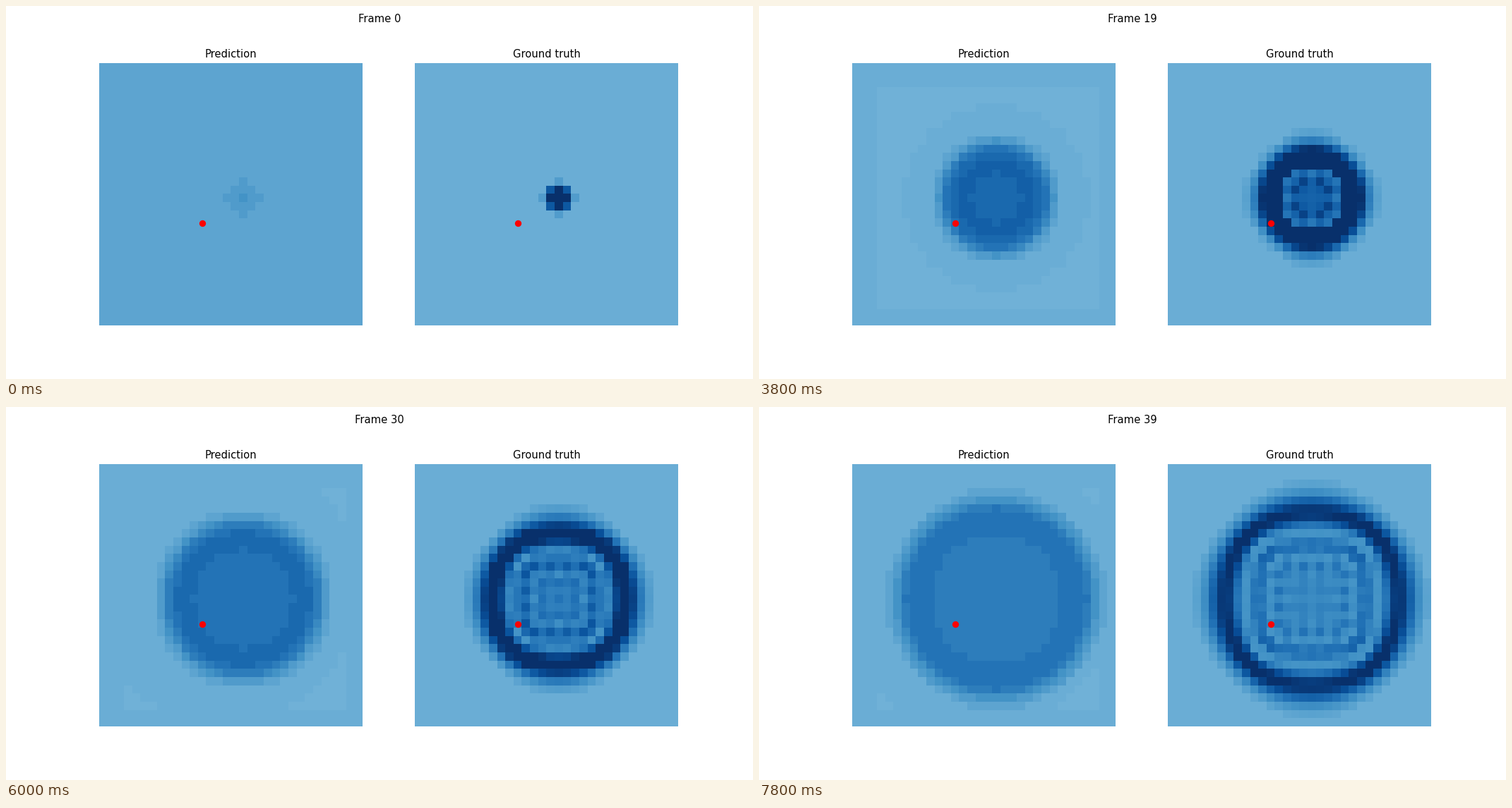
A matplotlib script for the animation above (8 s loop, 1058 px wide and 529 px high).

```python
import numpy as np
import matplotlib.pyplot as plt
from matplotlib.animation import FuncAnimation

SIZE = 32
FRAMES = 40
CX, CY = 17, 16          # wave centre, in cells
COURANT2 = 0.09          # (c * dt / dx) ** 2
AMPLITUDE = 2.4
TONE = 0.08              # spacing of the prediction's visible tones
FAINT = 0.062            # weaker waves blend into the background
FONT = 10.58

rows, cols = np.mgrid[:SIZE, :SIZE]
dx, dy = cols - CX, rows - CY
radius = np.hypot(dx, dy)


def laplacian(u):
    p = np.pad(u, 1)
    return p[2:, 1:-1] + p[:-2, 1:-1] + p[1:-1, 2:] + p[1:-1, :-2] - 4 * u


def solve_wave():
    """Leapfrog solution of an expanding wave, one field per frame."""
    prev, cur = np.zeros((SIZE, SIZE)), AMPLITUDE * np.exp(-radius**2)
    fields = []
    for _ in range(FRAMES):
        prev, cur = cur, 2 * cur - prev + COURANT2 * laplacian(cur)
        fields.append(np.where(cur < FAINT, 0, cur))
    return fields


def falloff(r, width):
    """Soft disc: 1 inside radius r, 0 outside."""
    return 1 / (1 + np.exp((radius - r) / width))


def predict(n):
    front = 1.85 + 0.27 * n
    width = 0.4 + 0.008 * n
    growth = min(1, 0.16 + 0.21 * n)
    height = growth * (0.56 + 0.3 * np.exp(-n / 14))
    dip = 0.007 * max(n - 8, 0)
    background = max(0, 0.085 - 0.06 * n)

    u = background + height * falloff(front - 0.65 * width, width)
    u -= dip * falloff(front - 4, 0.9)
    u = TONE * np.round(np.where(u < FAINT, 0, u) / TONE)

    # faint undershoot in a box, eaten away by a growing disc
    if n >= 10:
        disc = min(1.5 + 0.52 * n, 13.5 + 0.105 * n)
        shift = np.clip((n - 19) / 8, 0, 1)
        box = (cols >= 3) & (cols <= 29) & (rows >= 3) & (rows <= 29)
        outside = np.hypot(dx + 2.5 * shift, dy + 1.5 * shift) > disc
        u[box & outside & (u == 0)] = -0.025
    return u


truth = solve_wave()
prediction = [predict(n) for n in range(FRAMES)]

fig, axes = plt.subplots(1, 2, figsize=(10.58, 5.29), dpi=100)
heading = fig.suptitle("Frame 0", fontsize=FONT)
images = []
for ax, name, fields in zip(axes, ("Prediction", "Ground truth"),
                            (prediction, truth)):
    images.append(ax.imshow(fields[0], cmap="Blues", vmin=-1, vmax=1,
                            interpolation="nearest"))
    ax.autoscale(False)
    ax.plot(12, 19, "ro", markersize=5.7)
    ax.set_title(name, fontsize=FONT, pad=FONT / 2)
    ax.axis("off")


def draw(n):
    heading.set_text(f"Frame {n}")
    images[0].set_data(prediction[n])
    images[1].set_data(truth[n])
    return [heading, *images]


anim = FuncAnimation(fig, draw, frames=FRAMES, interval=200, repeat=True)
plt.show()
```
